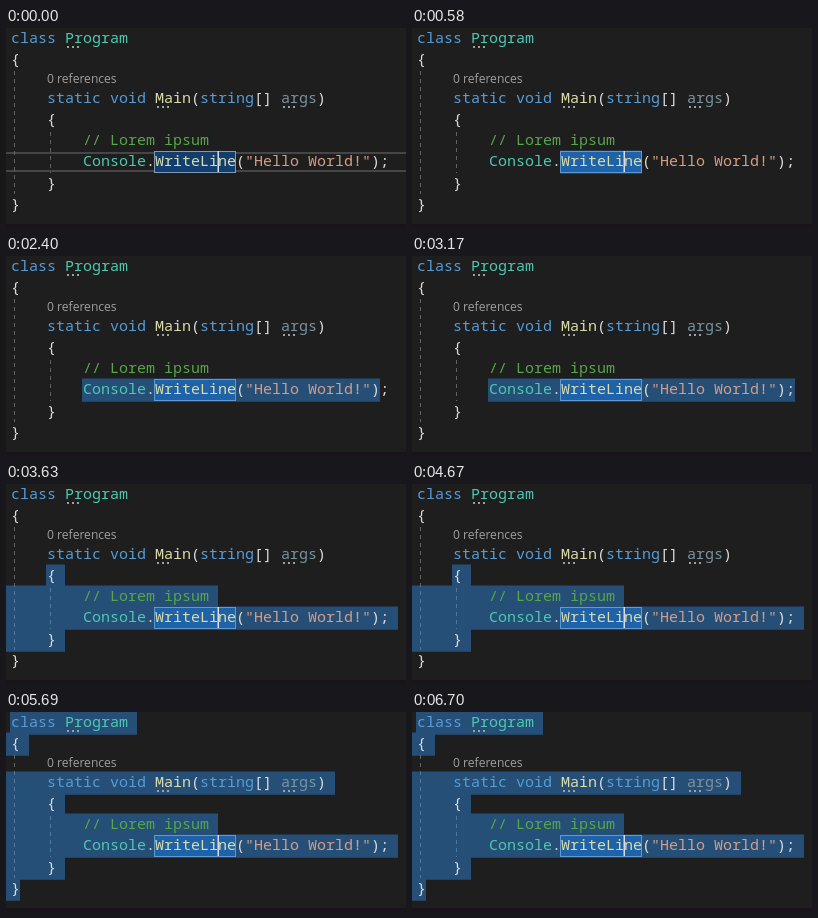
Recreate the animation shown at these times as an HTML page with a canvas. Size 400 by 200 pixels, loop 6730 ms.

```html
<!DOCTYPE html>
<html lang="en">
<head>
<meta charset="utf-8">
<title>Expanding selection</title>
<style>
  html, body { margin: 0; width: 100%; height: 100%; overflow: hidden; background: #1e1e1e; }
  canvas { display: block; }
</style>
</head>
<body>
<canvas id="stage" width="400" height="200"></canvas>
<script>
const ctx = document.getElementById('stage').getContext('2d');
const LOOP = 6730;
const LEFT = 5, CHAR = 9, ROW_H = 23.2;

const KEYWORD = '#569cd6', TYPE = '#4ec9b0', PLAIN = '#dcdcdc', METHOD = '#dcdcaa',
      COMMENT = '#57a64a', STRING = '#d69d85', UNUSED = '#7b939f';

// Each line: top edge, first column, coloured tokens
const lines = [
  { top: -1, col: 0, tokens: [['class ', KEYWORD], ['Program', TYPE]] },
  { top: 20, col: 0, tokens: [['{', PLAIN]] },
  { top: 59, col: 4, tokens: [['static void ', KEYWORD], ['Main', METHOD], ['(', PLAIN],
    ['string', KEYWORD], ['[] ', PLAIN], ['args', UNUSED], [')', PLAIN]] },
  { top: 80, col: 4, tokens: [['{', PLAIN]] },
  { top: 101, col: 8, tokens: [['// Lorem ipsum', COMMENT]] },
  { top: 122, col: 8, tokens: [['Console', TYPE], ['.', PLAIN], ['WriteLine', METHOD], ['(', PLAIN],
    ['"Hello World!"', STRING], [');', PLAIN]] },
  { top: 144, col: 4, tokens: [['}', PLAIN]] },
  { top: 165, col: 0, tokens: [['}', PLAIN]] }
];
for (const line of lines) {
  line.end = line.col + line.tokens.reduce((n, [text]) => n + text.length, 0);
}

// Selection ranges: start line and column, end line and column
const selections = [
  { at: 580, from: [5, 16], to: [5, 25] },
  { at: 1270, from: [5, 8], to: [5, 25] },
  { at: 1850, from: [5, 8], to: [5, 41] },
  { at: 2660, from: [5, 8], to: [5, 42] },
  { at: 3630, from: [3, 4], to: [6, 6] },
  { at: 4740, from: [2, 4], to: [6, 6] },
  { at: 5690, from: [0, 0], to: [7, 1] }
];

// Caret is visible first, then toggles at each time
const blinks = [510, 580, 1110, 1270, 1780, 1850, 2400, 2660, 3170, 3630, 4160, 4670, 5270, 5690, 6140, 6700];

const colX = col => LEFT + col * CHAR;

function fill(color, x, y, w, h) {
  ctx.fillStyle = color;
  ctx.fillRect(x, y, w, h);
}

function dashedGuide(x, top, bottom) {
  ctx.strokeStyle = '#626262';
  ctx.setLineDash([4, 4]);
  ctx.beginPath();
  ctx.moveTo(x + 0.5, top);
  ctx.lineTo(x + 0.5, bottom);
  ctx.stroke();
  ctx.setLineDash([]);
}

function drawSelection({ from, to }) {
  ctx.beginPath();
  for (let i = from[0]; i <= to[0]; i++) {
    const x = i === from[0] ? colX(from[1]) - 1 : 0;
    const end = i === to[0] ? to[1] : lines[i].end + 1;
    ctx.rect(x, lines[i].top + 0.5, colX(end) - x, ROW_H);
  }
  ctx.fillStyle = 'rgba(51,153,255,0.4)';
  ctx.fill();
}

function drawText() {
  ctx.font = '15px "Noto Sans Mono", "DejaVu Sans Mono", monospace';
  for (const line of lines) {
    let col = line.col;
    for (const [text, color] of line.tokens) {
      ctx.fillStyle = color;
      ctx.fillText(text, colX(col), line.top + 16);
      col += text.length;
    }
  }
  ctx.font = '12.1px "Open Sans", "Noto Sans", sans-serif';
  ctx.fillStyle = '#a0a0a0';
  ctx.fillText('0 references', 41, 55);
}

function hintDots(x, y) {
  for (let i = 0; i < 3; i++) fill('#a0a0a0', x + i * 5, y, 2, 2);
}

function draw(t) {
  fill('#1e1e1e', 0, 0, 400, 200);
  fill('#19141a', 0, 196, 400, 4);

  const selection = selections.filter(s => s.at <= t).pop();
  if (!selection) {
    fill('#464646', 0, 124, 400, 2);
    fill('#464646', 0, 142, 400, 2);
  }

  dashedGuide(8, 43, 166);
  dashedGuide(44, 104, 145);

  fill('#113d6f', 148, 123, 82, 22);
  ctx.strokeStyle = '#7f9ab5';
  ctx.lineWidth = 1;
  ctx.strokeRect(148.5, 123.5, 81, 21);

  if (selection) drawSelection(selection);
  drawText();
  hintDots(61, 18);
  hintDots(151, 78);
  hintDots(277, 78);

  const toggles = blinks.filter(b => b <= t).length;
  if (toggles % 2 === 0) fill('#dcdcdc', 211.5, 123, 1.5, 21);
}

const start = performance.now();
function tick() {
  draw((performance.now() - start) % LOOP);
  requestAnimationFrame(tick);
}
tick();
</script>
</body>
</html>
```
